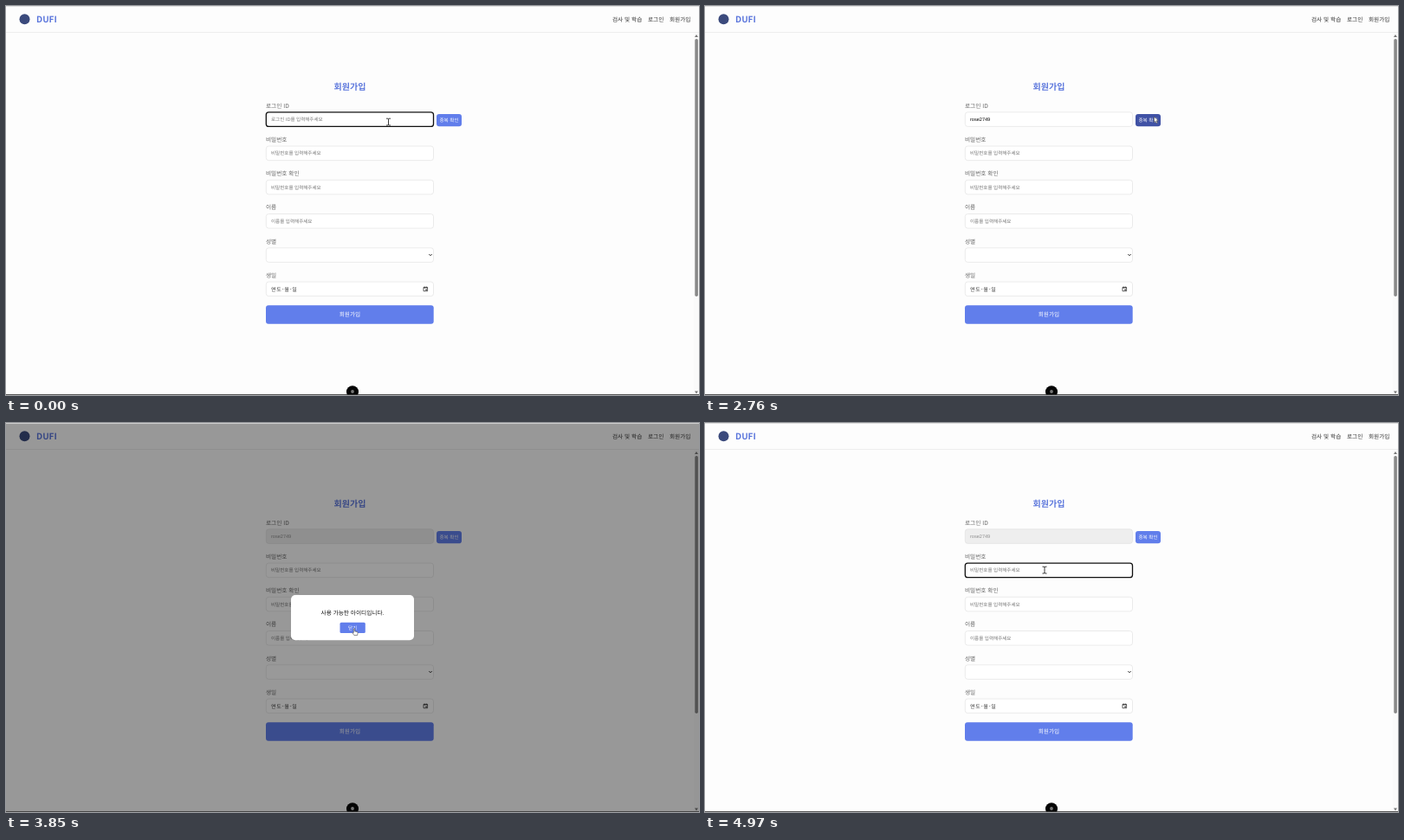
These frames come from a looping animation (800x450 px, 5 s). An HTML page:

```html
<!DOCTYPE html>
<html lang="ko">
<head>
<meta charset="utf-8">
<style>
html, body { margin: 0; width: 100%; height: 100%; overflow: hidden; background: #fdfdfd; }
svg { display: block; width: 100vw; height: 100vh; }
text { font: 6.67px "Noto Sans CJK KR", "Noto Sans CJK", sans-serif; fill: #333; text-rendering: geometricPrecision; white-space: pre; }
.label { fill: #666; }
.in { font: 5.55px "Liberation Sans", "Noto Sans CJK KR", sans-serif; fill: #757575; }
.big { font-size: 10px; font-weight: 700; fill: #5b76dc; }
.mid { text-anchor: middle; }
.btn { font-size: 5.55px; fill: #fff; }
.box { fill: #fff; stroke: #ddd; stroke-width: .6; }
.blue { fill: #617eeb; }
</style>
</head>
<body>
<svg viewBox="0 0 800 450" xmlns="http://www.w3.org/2000/svg">
  <rect width="800" height="450" fill="#fdfdfd"/>
  <rect y="30" width="800" height=".7" fill="#e8e8e8"/>
  <circle cx="21.5" cy="15.3" r="6" fill="#3b4a7c"/>
  <text class="big" x="35" y="19.3">DUFI</text>
  <text x="700" y="18">검사 및 학습</text>
  <text x="741" y="18">로그인</text>
  <text x="766" y="18">회원가입</text>

  <rect x="794" y="31" width="6" height="418" fill="#fafafa"/>
  <rect x="795.3" y="38" width="3.6" height="298" rx="1.8" fill="#888"/>
  <path d="M795 36l2-3 2 3zM795 445.500l2 3 2-3z" fill="#777"/>

  <text class="big mid" x="397" y="97.300">회원가입</text>
  <g id="form"></g>
  <path d="M488.300 287l1.700 1.800 1.700-1.800" fill="none" stroke="#222" stroke-width=".9"/>
  <text x="306" y="329.600" style="font-size:6px;letter-spacing:.7px">연도-월-일</text>
  <path d="M482 325.400h4.600v4.400h-4.600zM482 326h4.600M483.200 324.600v1M485.400 324.600v1" fill="none" stroke="#222" stroke-width=".7"/>
  <rect x="484.300" y="327.700" width="1.500" height="1.400" fill="#222"/>
  <rect id="caret" y="128" width=".6" height="6.300"/>

  <rect id="check" x="497" y="125" width="29" height="14.300" rx="3"/>
  <text class="btn mid" x="511.500" y="134.300">중복 확인</text>
  <rect class="blue" x="300" y="346.300" width="193.700" height="21.500" rx="3"/>
  <text class="mid" x="397" y="359.400" style="fill:#fff">회원가입</text>

  <g id="modal">
    <rect width="800" height="450" opacity=".4"/>
    <rect x="329" y="199" width="142" height="52.300" rx="5" fill="#fff"/>
    <text class="mid" x="400" y="221.800" style="fill:#111">사용 가능한 아이디입니다.</text>
    <rect class="blue" x="385.500" y="230.800" width="29.300" height="12.200" rx="1.500"/>
    <text class="btn mid" x="400" y="239">닫기</text>
  </g>

  <rect width="800" height=".8" fill="#ddd"/>
  <circle cx="400" cy="446.300" r="7" fill="#050505"/>
  <circle cx="400" cy="446" r="1.900" fill="#777"/>
  <rect y="449.200" width="800" height=".8" fill="#333"/>

  <g id="pointer" stroke-linejoin="round">
    <path id="beam" d="M-2.500-3.800h1.500q1 0 1 1 0-1 1-1h1.500M0-2.800v5.800M-2.500 4h1.500q1 0 1-1 0 1 1 1h1.500" fill="none" stroke="#222" stroke-width=".9"/>
    <path id="arrow" d="M0 0v6.600l1.500-1.400 1.100 2.500 1.200-.5-1.100-2.500h2.100z" fill="#fff" stroke="#444" stroke-width=".6"/>
    <path id="hand" d="M-.7 0q.7-.7 1.400 0v3l2.700.6q.8.300.7 1.200l-.5 2.800h-3.700l-1.900-2.800q.2-.8 1.300-.2z" fill="#fff" stroke="#444" stroke-width=".6"/>
  </g>
</svg>
<script>
const $ = id => document.getElementById(id);
const USER = "rose2749";
const KEYS = [130, 270, 420, 580, 880, 1240, 1390, 1550];
const BLUR = 2640, OPEN = 2790, CLOSE = 3880, FOCUS = 4870;
// start, end, x, y of each pointer move
const MOVES = [[0, 1, 441.5, 134], [2090, 2580, 518.5, 128], [3180, 3700, 402, 238], [4270, 4790, 392, 170]];
const FIELDS = [
  ["로그인 ID", "로그인 ID를 입력해주세요"],
  ["비밀번호", "비밀번호를 입력해주세요"],
  ["비밀번호 확인", "비밀번호를 입력해주세요"],
  ["이름", "이름를 입력해주세요"],
  ["성별", ""],
  ["생일", ""]
];
const top0 = 122.8, step = 39.25;

$("form").innerHTML = FIELDS.map(([label, hint], i) => {
  const y = top0 + i * step;
  return `<text class="label" x="300" y="${y - 5.3}">${label}</text>
    <rect class="box" id="box${i}" x="300.3" y="${y}" width="193.2" height="16.6" rx="3"/>
    <text class="in" id="in${i}" x="306" y="${y + 10.3}">${hint}</text>`;
}).join("");

const show = (id, on) => $(id).setAttribute("display", on ? "inline" : "none");
const inside = (x, y, l, t, r, b) => x >= l && x <= r && y >= t && y <= b;

function pointerAt(t) {
  let [, , x, y] = MOVES[0];
  for (const [a, b, tx, ty] of MOVES) {
    const p = Math.min(1, Math.max(0, (t - a) / (b - a)));
    const e = p * p * (3 - 2 * p);
    x += (tx - x) * e;
    y += (ty - y) * e;
  }
  return [x, y];
}

function focusBox(i, on) {
  $("box" + i).style.cssText = on ? "stroke:#111;stroke-width:1.3" : "";
}

function draw(t) {
  const typed = KEYS.filter(k => k <= t).length;
  const modal = t >= OPEN && t < CLOSE;
  const locked = t >= OPEN;
  const idFocus = t < BLUR;

  focusBox(0, idFocus);
  focusBox(1, t >= FOCUS);
  $("box0").style.fill = locked ? "#eee" : "#fff";
  const input = $("in0");
  input.textContent = typed ? USER.slice(0, typed) : FIELDS[0][1];
  input.style.fill = locked ? "#8c8c8c" : typed ? "#000" : "";

  const blinkOn = typed && (t - KEYS[typed - 1]) % 1000 < 500;
  show("caret", idFocus && blinkOn);
  if (typed) $("caret").setAttribute("x", 306.2 + input.getComputedTextLength());

  const [x, y] = pointerAt(t);
  const overCheck = !modal && inside(x, y, 497, 125, 526, 139);
  $("check").setAttribute("fill", overCheck ? "#4052a5" : "#617eeb");
  show("modal", modal);

  const overClose = modal && inside(x, y, 385, 231, 415, 243);
  const row = (y - top0) / step;
  const overField = !modal && x < 494 && row >= 0 && (row % 1) * step < 16.6;
  show("beam", overField);
  show("hand", overClose);
  show("arrow", !overField && !overClose);
  $("pointer").setAttribute("transform", `translate(${x} ${y})`);
}

const start = performance.now();
function tick() {
  draw((performance.now() - start) % 5000);
  requestAnimationFrame(tick);
}
tick();
</script>
</body>
</html>
```
